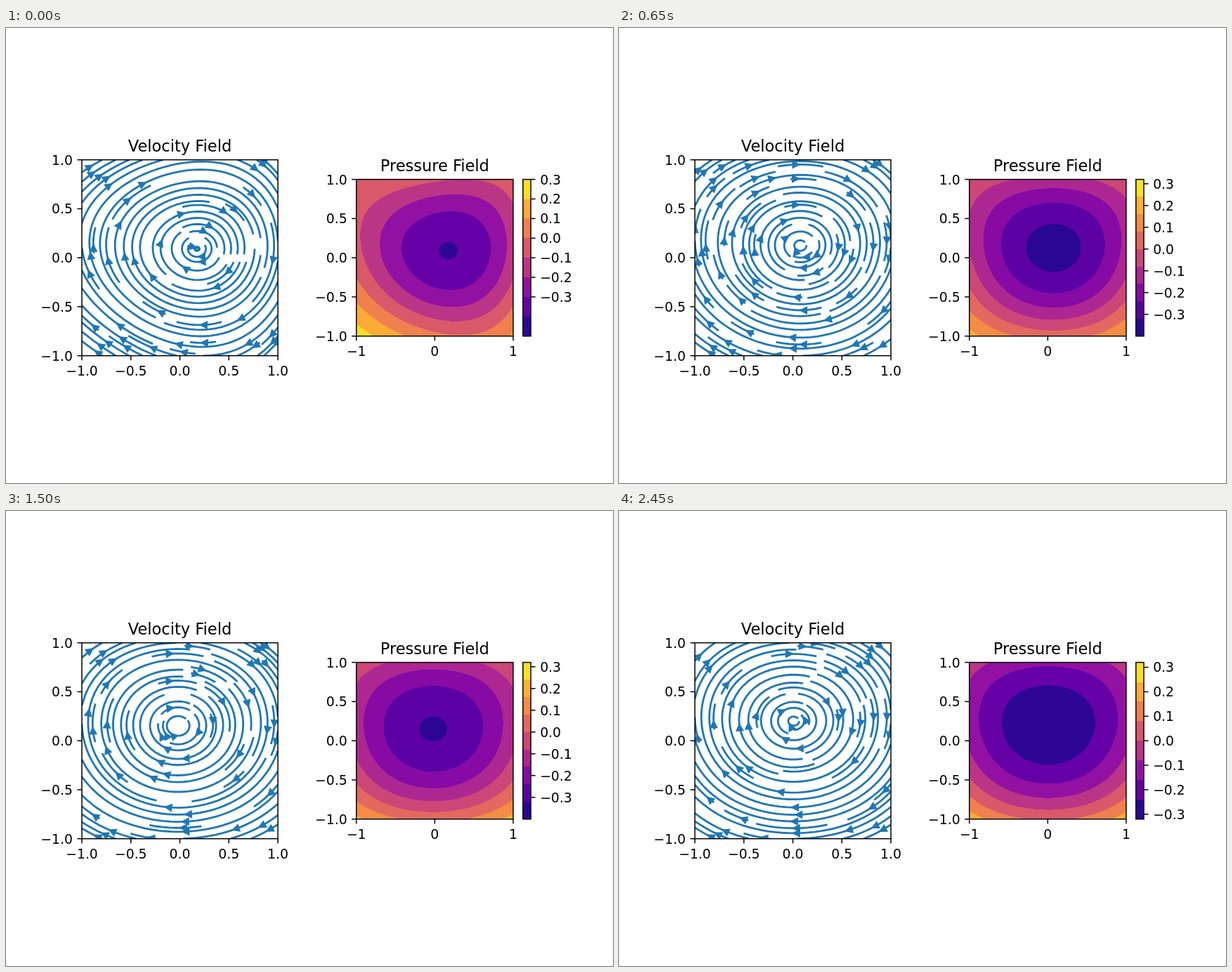
Animation of 864x648 px, one loop 2.5 s. Source, as an HTML page with a canvas:

```html
<!DOCTYPE html>
<html lang="en">
<head>
<meta charset="utf-8">
<title>Velocity and pressure</title>
<style>
  html, body { margin: 0; width: 100%; height: 100%; overflow: hidden; background: #fff; }
  canvas { display: block; }
</style>
</head>
<body>
<canvas id="stage" width="864" height="648"></canvas>
<script>
const ctx = document.getElementById('stage').getContext('2d');
const FRAME_MS = 50, FRAMES = 50;
const PT = 1.875; // pixels per typographic point
const BLUE = '#1f77b4';
const VELOCITY = { x: 108, y: 187.7, size: 279 };
const PRESSURE = { x: 498.7, y: 215.6, size: 223.2 };
const BAR = { x: 735.8, y: 215.6, w: 11.2, h: 223.2 };

// Vortex shape over time: t, centre x, y, minimum, then coefficients of
// X², Y², X³, X²Y, XY², X⁴, Y⁴, X²Y².
const KEYS = [
  [0, .175, .09, -.405, .335, .435, .06, -.08, -.06, -.015, -.07, -.185],
  [.25, .14, .1, -.38, .295, .39, .03, -.07, -.02, -.015, -.045, -.17],
  [.65, .076, .125, -.352, .265, .345, .01, -.062, 0, -.018, -.025, -.14],
  [1.15, .005, .14, -.334, .235, .305, 0, -.047, 0, -.013, -.005, -.107],
  [1.5, -.018, .152, -.327, .222, .29, 0, -.04, 0, -.012, 0, -.095],
  [1.9, -.02, .162, -.321, .206, .28, 0, -.04, 0, -.002, 0, -.092],
  [2.45, .008, .201, -.307, .189, .262, 0, -.044, 0, 0, 0, -.073]
];

const PLASMA = ['0d0887', '41049d', '6a00a8', '8f0da4', 'b12a90', 'cc4778',
  'e16462', 'f2844b', 'fca636', 'fcce25', 'f0f921']
  .map(hex => [0, 2, 4].map(i => parseInt(hex.slice(i, i + 2), 16)));

const mix = (a, b, f) => a.map((v, i) => v + (b[i] - v) * f);

function plasma(v) {
  const i = Math.min(9, Math.floor(v * 10));
  return mix(PLASMA[i], PLASMA[i + 1], v * 10 - i).map(Math.round);
}

function shapeAt(t) {
  let i = 0;
  while (i < KEYS.length - 2 && t >= KEYS[i + 1][0]) i++;
  const [a, b] = [KEYS[i], KEYS[i + 1]];
  return mix(a, b, (t - a[0]) / (b[0] - a[0]));
}

function levelsAt(t) {
  const [low, high, step] = t < .095 ? [-.5, .3, .1] : t < 1.945 ? [-.4, .32, .08] : [-.32, .32, .08];
  const count = Math.round((high - low) / step);
  const colors = Array.from({ length: count }, (_, i) => plasma((i + .5) / count));
  return { low, high, step, count, colors };
}

function pressureAt(s, x, y) {
  const X = x - s[1], Y = y - s[2], XX = X * X, YY = Y * Y;
  return s[3] + XX * (s[4] + s[6] * X + s[9] * XX) + YY * (s[5] + s[10] * YY)
    + s[7] * XX * Y + s[8] * X * YY + s[11] * XX * YY;
}

// Unit flow direction at a point of the unit square, from a stream function.
function flowAt(s, px, py) {
  const X = 2 * px - 1 - s[1], Y = 2 * py - 1 - s[2];
  const [e, f, i] = [s[7] / 2, s[8] / 2, s[11] / 2];
  const u = 2 * s[5] * Y + 4 * s[10] * Y ** 3 + e * X * X + 2 * f * X * Y + 2 * i * X * X * Y;
  const v = -(2 * s[4] * X + 3 * s[6] * X * X + 4 * s[9] * X ** 3
    + 2 * e * X * Y + f * Y * Y + 2 * i * X * Y * Y);
  const speed = Math.hypot(u, v) || 1;
  return [u / speed, v / speed];
}

// Cells of an n by n grid, spiralling inwards from the lower left corner.
function* spiral(n) {
  let x0 = 0, y0 = 1, x1 = n - 1, y1 = n - 1, x = 0, y = 0, dir = 0;
  for (let i = 0; i < n * n; i++) {
    yield [x, y];
    if (dir === 0) { if (++x >= x1) { x1--; dir = 1; } }
    else if (dir === 1) { if (++y >= y1) { y1--; dir = 2; } }
    else if (dir === 2) { if (--x <= x0) { x0++; dir = 3; } }
    else if (--y <= y0) { y0++; dir = 0; }
  }
}

// Evenly spaced streamlines: each one claims mask cells and stops at claimed ones.
function streamlines(s) {
  const N = 30, MAX_STEP = 1 / N, MAX_ERROR = .003, MIN_LENGTH = .1, MAX_LENGTH = 4;
  const mask = new Uint8Array(N * N);
  const cellOf = (x, y) => Math.round(y * (N - 1)) * N + Math.round(x * (N - 1));
  const inside = (x, y) => x >= 0 && x <= 1 && y >= 0 && y <= 1;
  const lines = [];

  function trace(x, y, sign, claimed) {
    const points = [[x, y]];
    let current = cellOf(x, y), ds = MAX_STEP, total = 0;
    while (true) {
      const [ax, ay] = flowAt(s, x, y).map(k => k * sign);
      const mx = x + ds * ax, my = y + ds * ay;
      let nx, ny, error;
      let out = !inside(mx, my);
      if (!out) {
        const [bx, by] = flowAt(s, mx, my).map(k => k * sign);
        nx = x + ds * (ax + bx) / 2;
        ny = y + ds * (ay + by) / 2;
        error = ds / 2 * Math.hypot(bx - ax, by - ay);
        out = error < MAX_ERROR && !inside(nx, ny);
      }
      if (out) {
        const reach = (p, d) => d === 0 ? Infinity : d < 0 ? -p / d : (1 - p) / d;
        const last = Math.min(reach(x, ax), reach(y, ay));
        points.push([x + ax * last, y + ay * last]);
        total += last;
        break;
      }
      if (error < MAX_ERROR) {
        const cell = cellOf(nx, ny);
        if (cell !== current) {
          if (mask[cell]) break;
          mask[cell] = 1;
          claimed.push(cell);
          current = cell;
        }
        if (total + ds > MAX_LENGTH) break;
        x = nx;
        y = ny;
        total += ds;
        points.push([x, y]);
      }
      ds = error === 0 ? MAX_STEP : Math.min(MAX_STEP, .85 * ds * Math.sqrt(MAX_ERROR / error));
    }
    return { points, total };
  }

  for (const [cx, cy] of spiral(N)) {
    const cell = cy * N + cx;
    if (mask[cell]) continue;
    mask[cell] = 1;
    const claimed = [cell];
    const start = [cx / (N - 1), cy / (N - 1)];
    const back = trace(...start, -1, claimed);
    const ahead = trace(...start, 1, claimed);
    if (back.total + ahead.total > MIN_LENGTH) {
      lines.push(back.points.reverse().concat(ahead.points.slice(1)));
    } else {
      claimed.forEach(c => { mask[c] = 0; });
    }
  }
  return lines;
}

function drawArrow(line) {
  const sums = [];
  let length = 0;
  for (let i = 1; i < line.length; i++) {
    length += Math.hypot(line[i][0] - line[i - 1][0], line[i][1] - line[i - 1][1]);
    sums.push(length);
  }
  const n = sums.findIndex(d => d >= length / 2);
  const [a, b] = [line[n], line[n + 1]];
  ctx.save();
  ctx.translate((a[0] + b[0]) / 2, (a[1] + b[1]) / 2);
  ctx.rotate(Math.atan2(b[1] - a[1], b[0] - a[0]));
  ctx.beginPath();
  ctx.moveTo(-3.1, 0);
  ctx.lineTo(-3.1 - 4 * PT, -2 * PT);
  ctx.lineTo(-3.1 - 4 * PT, 2 * PT);
  ctx.closePath();
  ctx.fill();
  ctx.stroke();
  ctx.restore();
}

function drawVelocity(s) {
  const { x, y, size } = VELOCITY;
  ctx.save();
  ctx.beginPath();
  ctx.rect(x, y, size, size);
  ctx.clip();
  ctx.strokeStyle = ctx.fillStyle = BLUE;
  ctx.lineWidth = 1.5 * PT;
  ctx.lineJoin = 'miter';
  const lines = streamlines(s).map(line =>
    line.map(([px, py]) => [x + px * size, y + (1 - py) * size]));
  for (const line of lines) {
    ctx.beginPath();
    line.forEach(p => ctx.lineTo(...p));
    ctx.stroke();
  }
  lines.forEach(drawArrow);
  ctx.restore();
}

function drawPressure(s, levels) {
  const { x, y, size } = PRESSURE;
  const left = Math.round(x), top = Math.round(y), n = Math.floor(size);
  const image = ctx.createImageData(n, n);
  for (let row = 0, at = 0; row < n; row++) {
    const dy = 1 - 2 * (top + row + .5 - y) / size;
    for (let col = 0; col < n; col++, at += 4) {
      const dx = 2 * (left + col + .5 - x) / size - 1;
      const band = Math.floor((pressureAt(s, dx, dy) - levels.low) / levels.step);
      const color = levels.colors[Math.max(0, Math.min(levels.count - 1, band))];
      image.data.set(color, at);
      image.data[at + 3] = 255;
    }
  }
  ctx.putImageData(image, left, top);
}

function strokeLine(x0, y0, x1, y1) {
  ctx.beginPath();
  ctx.moveTo(x0, y0);
  ctx.lineTo(x1, y1);
  ctx.stroke();
}

function label(text, x, y, align, points = 10) {
  ctx.font = `${points * PT}px "DejaVu Sans", sans-serif`;
  ctx.textAlign = align;
  ctx.fillText(text, x, y);
}

const number = (v, digits) => v.toFixed(digits).replace('-', '\u2212');

function drawAxes({ x, y, size }, title, xTicks, xDigits) {
  const bottom = y + size, tick = 3.5 * PT;
  ctx.strokeRect(x, y, size, size);
  for (const v of xTicks) {
    const tx = x + (v + 1) / 2 * size;
    strokeLine(tx, bottom, tx, bottom + tick);
    label(number(v, xDigits), tx, bottom + 27.8, 'center');
  }
  for (const v of [-1, -.5, 0, .5, 1]) {
    const ty = y + (1 - v) / 2 * size;
    strokeLine(x - tick, ty, x, ty);
    label(number(v, 1), x - 7 * PT, ty + 6.9, 'right');
  }
  label(title, x + size / 2, y - 6 * PT, 'center', 12);
}

function drawBar(levels) {
  const { x, y, w, h } = BAR;
  const edge = i => Math.round(y + h * (1 - i / levels.count));
  levels.colors.forEach((color, i) => {
    ctx.fillStyle = `rgb(${color})`;
    ctx.fillRect(x, edge(i + 1), w, edge(i) - edge(i + 1));
  });
  ctx.fillStyle = '#000';
  ctx.strokeRect(x, y, w, h);
  for (let i = 3; i >= -3; i--) {
    const ty = y + h * (levels.high - i / 10) / (levels.high - levels.low);
    strokeLine(x + w, ty, x + w + 3.5 * PT, ty);
    label(number(i / 10, 1), x + w + 7 * PT, ty + 6.9, 'left');
  }
}

function draw(t) {
  const shape = shapeAt(t), levels = levelsAt(t);
  ctx.fillStyle = '#fff';
  ctx.fillRect(0, 0, 864, 648);
  drawVelocity(shape);
  drawPressure(shape, levels);
  ctx.fillStyle = ctx.strokeStyle = '#000';
  ctx.lineWidth = .8 * PT;
  drawAxes(VELOCITY, 'Velocity Field', [-1, -.5, 0, .5, 1], 1);
  drawAxes(PRESSURE, 'Pressure Field', [-1, 0, 1], 0);
  drawBar(levels);
}

let shown = -1;
function loop() {
  const frame = Math.floor(performance.now() / FRAME_MS) % FRAMES;
  if (frame !== shown) {
    shown = frame;
    draw(frame * FRAME_MS / 1000);
  }
  requestAnimationFrame(loop);
}
loop();
</script>
</body>
</html>
```
